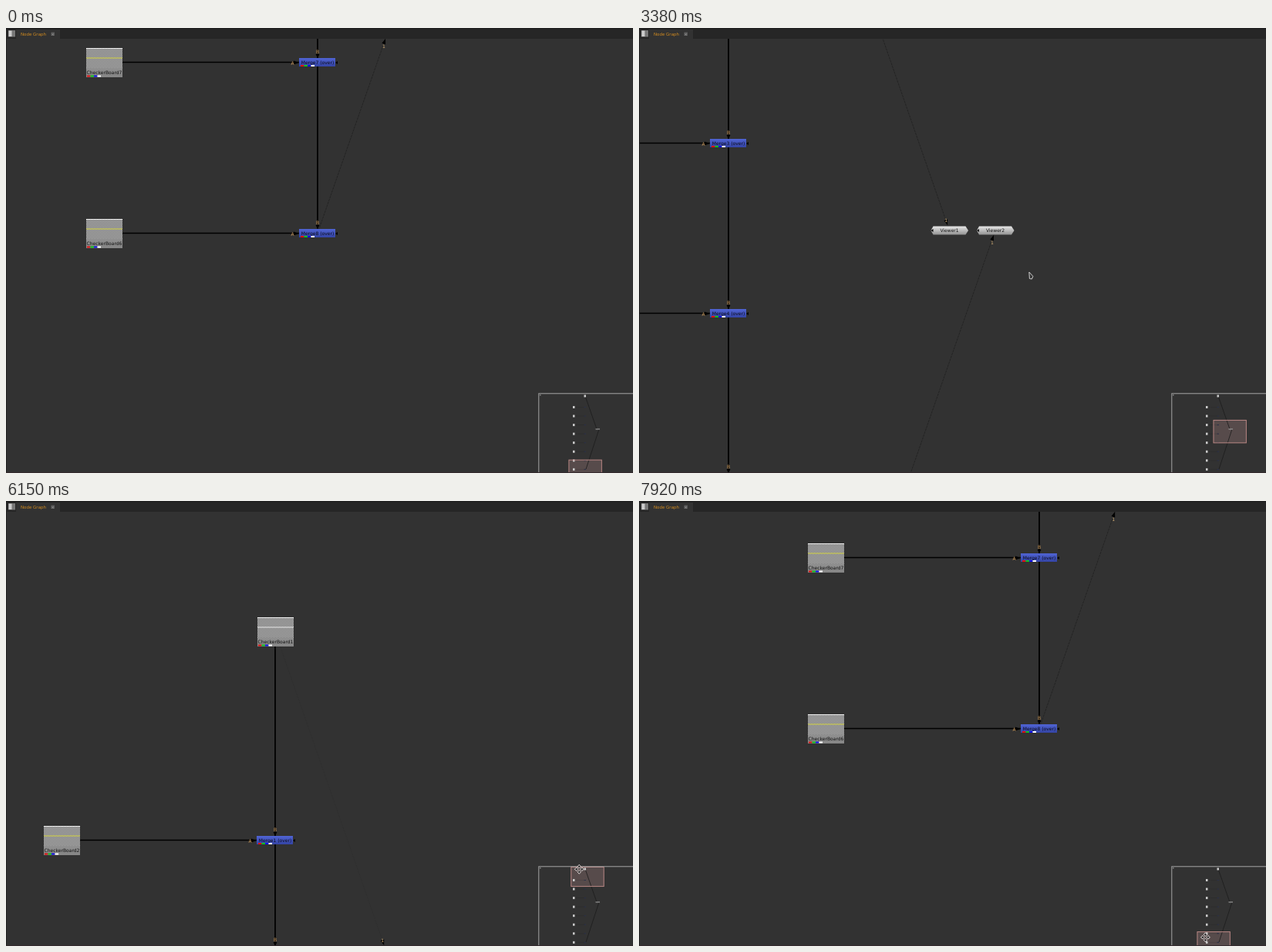
Recreate the animation shown at these times as an HTML page with a canvas. Size 813 px wide and 578 px high, loop 8 s.

```html
<!DOCTYPE html>
<html>
<head>
<meta charset="utf-8">
<style>
html, body { margin: 0; width: 100%; height: 100%; overflow: hidden; background: #323232; }
canvas { display: block; }
</style>
</head>
<body>
<canvas id="stage" width="813" height="578"></canvas>
<script>
const W = 813, H = 578, TOP = 14, LOOP = 8000;
const TICK = 1000 / 13;          // the view is redrawn 13 times a second
const GAP = 221.2, MINI = 0.0522; // node spacing, scale of the overview
const HOME = [404, 266.5];       // lowest merge node at the start
const c = document.getElementById('stage').getContext('2d');

// One drag of the view: first and last tick, shift of the graph, where the mouse grabs
const drag = (from, to, shift, grab) => ({ from, to, shift, grab, scale: 1 });
// A drag in the overview moves the mouse the other way and far less
const scrub = (from, to, shift, grab) => ({ from, to, shift, grab, scale: -MINI });
const moves = [
  drag(16, 21, [-58, 295.5], [583, 90]),
  drag(22, 30, [-88, 403], [525, 37]),
  drag(32, 40, [-142.5, 291], [642, 13]),
  drag(44, 55, [92, 182], [499, 305]),
  drag(60, 69, [-26, 250], [640, 120]),
  scrub(70, 80, [167.5, 301], [752, 494]),
  scrub(81, 91, [-239, -789]),
  scrub(91, 96, [370, -845]),
  scrub(96, 103, [38.5, -59.5])
];

const progress = (tick, from, to) => Math.min(1, Math.max(0, (tick - from) / (to - from)));
const along = (p, d, k) => [p[0] + d[0] * k, p[1] + d[1] * k];

function viewAt(tick) {
  return moves.reduce((p, m) => along(p, m.shift, progress(tick, m.from, m.to)), HOME);
}

function mouseAt(tick) {
  let pos = [795, 520], last = 9;
  for (const m of moves) {
    const grab = m.grab || pos;
    if (tick < m.from) return along(pos, [grab[0] - pos[0], grab[1] - pos[1]], progress(tick, last, m.from));
    pos = along(grab, m.shift, m.scale * progress(tick, m.from, m.to));
    if (tick < m.to) return pos;
    last = m.to;
  }
  return pos;
}

function rect(x, y, w, h, fill) {
  c.fillStyle = fill;
  c.fillRect(x, y, w, h);
}

function line(x1, y1, x2, y2, color, width) {
  c.strokeStyle = color;
  c.lineWidth = width;
  c.beginPath();
  c.moveTo(x1, y1);
  c.lineTo(x2, y2);
  c.stroke();
}

function poly(points, fill, stroke) {
  c.beginPath();
  points.forEach(p => c.lineTo(...p));
  c.closePath();
  c.fillStyle = fill;
  c.fill();
  if (stroke) {
    c.strokeStyle = stroke;
    c.lineWidth = 1;
    c.stroke();
  }
}

function text(s, x, y, color, align = 'center', size = 6) {
  c.font = `${size}px "DejaVu Sans", sans-serif`;
  c.textAlign = align;
  c.fillStyle = color;
  c.fillText(s, x, y + 2.2);
}

function shade(y, h, from, to) {
  const g = c.createLinearGradient(0, y, 0, y + h);
  g.addColorStop(0, from);
  g.addColorStop(1, to);
  return g;
}

// Arrowhead with its tip at x, y
function arrow(x, y, angle, length = 7, half = 2.5) {
  c.save();
  c.translate(x, y);
  c.rotate(angle);
  poly([[0, 0], [-length, -half], [-length, half]], '#000');
  c.restore();
}

const tile = document.createElement('canvas');
tile.width = tile.height = 2;
const tc = tile.getContext('2d');
tc.fillStyle = '#cfcfcf';
tc.fillRect(0, 0, 2, 2);
tc.fillStyle = '#5a5a5a';
tc.fillRect(0, 0, 1, 1);
tc.fillRect(1, 1, 1, 1);
const checks = c.createPattern(tile, 'repeat');

function channels(x, y) {
  ['#e01010', '#10c020', '#1010e8', '#fff'].forEach((color, i) => rect(x + i * 4.5, y, 4.5, 2, color));
}

function board(n, x, y) {
  c.save();
  c.translate(x, y);
  rect(0, 0, 47, 38, shade(0, 38, '#a8a8a8', '#858585'));
  rect(0, 1, 47, 25, checks);
  rect(0, 0, 47, 1, '#eee');
  rect(0, 12.5, 47, 1, n === 1 ? '#e8e8e8' : '#d4d440');
  text('CheckerBoard' + n, 23.5, 32, '#111');
  channels(1, 35.5);
  c.restore();
}

function merge(n, x, y) {
  rect(x - 24, y - 6, 47, 11, shade(y - 6, 11, '#5064d4', '#3444a4'));
  text(`Merge${n} (over)`, x, y, '#0a0a18');
  channels(x - 22, y + 3);
  arrow(x - 24, y, 0);
  arrow(x + 23, y, Math.PI, 3, 2);
  text('A', x - 32.5, y + 1, '#d6a05c');
}

function viewer(n, x, y) {
  poly([[x - 24, y], [x - 21, y - 5.5], [x + 21, y - 5.5], [x + 24.5, y], [x + 21, y + 5.5], [x - 21, y + 5.5]],
    shade(y - 5, 11, '#e2e2e2', '#8e8e8e'));
  arrow(x - 24, y, Math.PI, 3, 2);
  text('Viewer' + n, x, y, '#111');
}

// Thin wire to a viewer; its arrow and label stay inside the view
function wire(x1, y1, x2, y2, edge, faint) {
  const down = y2 > y1;
  c.setLineDash([3, 1]);
  line(x1, y1, x2, y2, faint ? 'rgba(20,20,20,.1)' : '#202020', 0.8);
  c.setLineDash([]);
  const y = down ? Math.min(y2 - 7, edge) : Math.max(y2 + 6, edge);
  const x = x1 + (x2 - x1) * (y - y1) / (y2 - y1);
  arrow(x, y, Math.atan2(y2 - y1, x2 - x1));
  text('1', x - 2, y + (down ? -6 : 9.5), '#d6b078');
}

function graph(tick) {
  const [cx, cy] = viewAt(tick), x = Math.round(cx);
  const mergeY = n => Math.round(cy - GAP * (8 - n));
  const firstTop = mergeY(1) - 290, viewY = mergeY(4) - 108;
  const faint = tick > 52 && tick < 96;

  line(x, firstTop + 38, x, cy - 6, '#000', 1.8);
  wire(x, firstTop + 19, x + 286.5, viewY, 577, faint);
  wire(x, cy, x + 346, viewY, TOP, faint);
  for (let n = 1; n <= 8; n++) {
    const y = mergeY(n);
    line(x - 254, y - 0.5, x - 24, y - 0.5, '#000', 1.6);
    if (y - GAP < H) {
      const tip = Math.min(y - 6, H);
      arrow(x, tip, Math.PI / 2, 5);
      text('B', x, tip - 8, '#d6a05c');
    }
    merge(n, x, y);
    board(n < 5 ? n + 1 : 14 - n, x - 300, y - 19);
  }
  board(1, x - 23, firstTop);
  viewer(1, x + 286.5, viewY);
  viewer(2, x + 346, viewY);
  overview(cx, cy);
}

function overview(cx, cy) {
  c.save();
  c.beginPath();
  c.rect(690, 474, 123, 103);
  c.clip();
  rect(690, 474, 123, 103, '#323232');
  const left = 751 - MINI * cx, bottom = 604.4 - MINI * cy, top = Math.max(475.5, bottom - 29.4);
  rect(left, top, 42.4, bottom - top, '#574b4b');
  line(751, 478, 766, 521, '#1c1c1c', 0.8);
  line(769, 521, 752, 573, '#1c1c1c', 0.8);
  for (let i = 0; i < 8; i++) {
    const y = 492.5 + i * GAP * MINI;
    line(737, y, 751, y, 'rgba(20,20,20,.25)', 0.5);
    rect(735, y - 1.5, 2.5, 3, '#ccc');
    rect(749.5, y - 0.5, 2.5, 1, '#2a3048');
  }
  rect(749.5, 476.5, 2.5, 3, '#ccc');
  rect(764.5, 520.5, 5.5, 1, '#aaa');
  c.lineWidth = 1;
  c.strokeStyle = '#b98784';
  c.strokeRect(left, top, 42.4, bottom - top);
  c.strokeStyle = '#a5a5a5';
  c.strokeRect(690.8, 474.8, 130, 120);
  rect(692, 476, 1.5, 1.5, '#888');
  c.restore();
}

function pointer(tick) {
  if (tick < 9) return;
  c.save();
  c.translate(...mouseAt(tick + 1)); // the graph trails the mouse by one tick
  if (tick < 70) {
    poly([[-1.5, -4.5], [3.5, 1], [2, 4.5], [-1, 4]], '#333', '#d0d0d0');
  } else {
    for (let i = 0; i < 4; i++) {
      c.rotate(Math.PI / 2);
      poly([[6, 0], [3.5, -2.2], [1.3, 0], [3.5, 2.2]], '#333', '#e6dcdc');
    }
  }
  c.restore();
}

function header() {
  rect(0, 0, W, TOP, '#262626');
  rect(0, 0, W, 1.5, '#1e1e1e');
  rect(13, 2, 57, 12, '#323232');
  rect(3, 3, 9, 8.5, '#777');
  rect(3.5, 3.5, 4, 7.5, '#ccc');
  text('Node Graph', 19, 8, '#d08a20', 'left', 5.5);
  rect(58.5, 5.5, 4.5, 4.5, '#5c5c5c');
  text('×', 60.7, 7.8, '#999', 'center', 5);
}

const start = performance.now();
function draw() {
  const ms = (performance.now() - start) % LOOP;
  const tick = Math.floor((ms + 5) / TICK);
  header();
  rect(0, TOP, W, H - TOP, '#323232');
  c.save();
  c.beginPath();
  c.rect(1, TOP, W - 1, 563);
  c.clip();
  graph(tick);
  pointer(tick);
  c.restore();
  rect(0, TOP, 1, H, '#222');
  rect(0, 577, W, 1, '#352a2e');
  requestAnimationFrame(draw);
}
draw();
</script>
</body>
</html>
```
